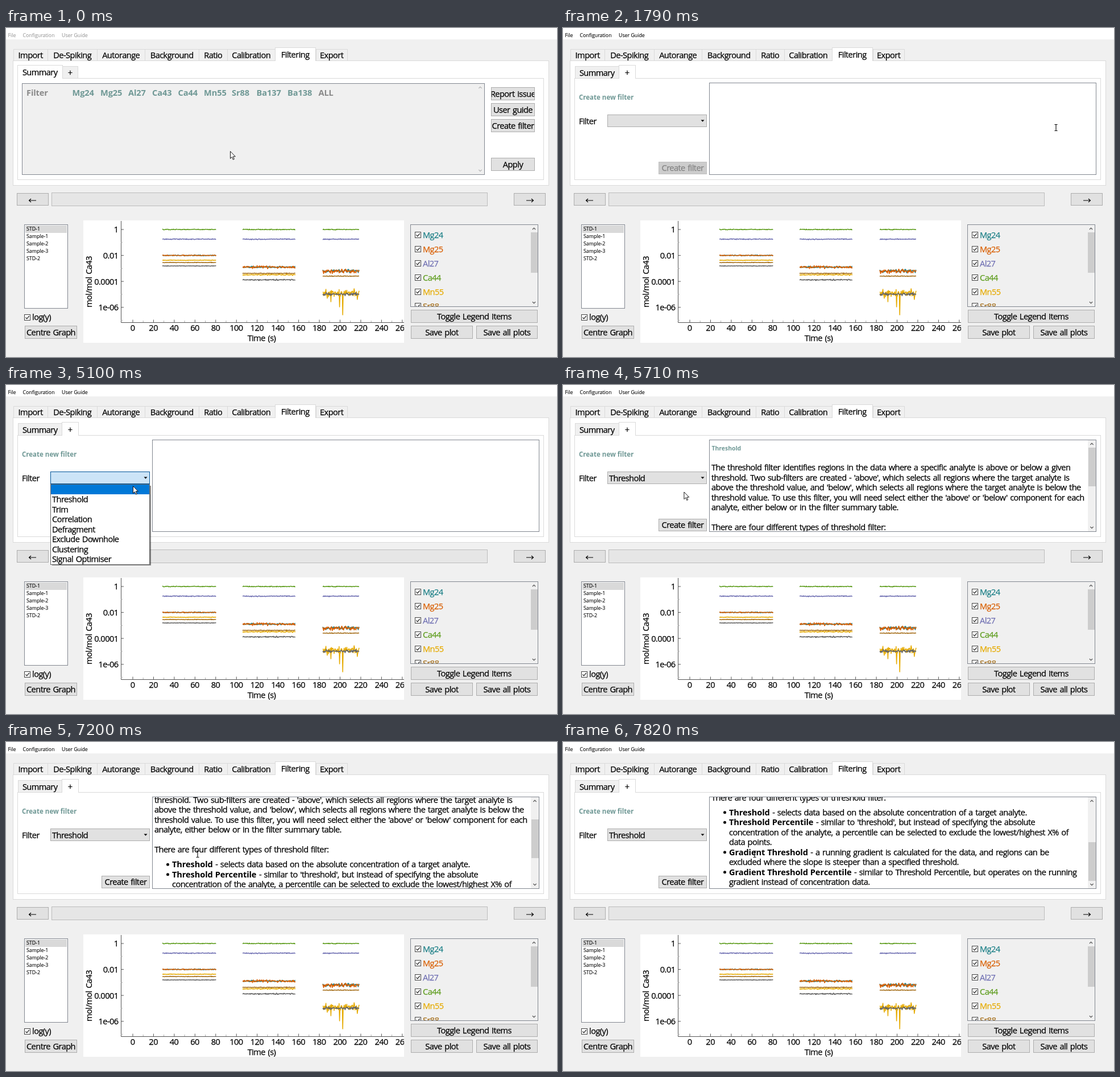
These frames come from a looping animation (969x578 px, 8 s). An HTML page:

```html
<!DOCTYPE html>
<html lang="en">
<head>
<meta charset="utf-8">
<title>Filtering tab</title>
<style>
  html, body { margin: 0; width: 100%; height: 100%; overflow: hidden; background: #f0f0f0; }
  svg { display: block; width: 969px; height: 578px; }
  text { font: 14.6px "Open Sans", "Noto Sans", sans-serif; letter-spacing: -.56px; word-spacing: 1.3px; white-space: pre;
         fill: currentColor; stroke: currentColor; stroke-width: .25px; }
  .small { font-size: 8.8px; letter-spacing: 0; word-spacing: 0; stroke-width: .1px; }
  .bold { font-weight: 700; letter-spacing: -.1px; word-spacing: .3px; stroke: none; }
  .head { font-weight: 700; letter-spacing: -.1px; stroke: none; }
  .h2 { font-size: 11.5px; font-weight: 700; letter-spacing: 0; word-spacing: 0; stroke: none; }
  .h3 { font-size: 10.4px; font-weight: 700; letter-spacing: 0; stroke: none; }
  rect { shape-rendering: crispEdges; }
</style>
</head>
<body>
<svg id="stage" viewBox="0 0 969 578" xmlns="http://www.w3.org/2000/svg"></svg>
<script>
const LOOP = 8000;
const TEAL = '#6f9895', EDGE = '#dadada', FIELD = '#828790';
const FACE = { normal: ['#e1e1e1', '#adadad'], hover: ['#e5f1fb', '#0078d7'],
               down: ['#cce4f7', '#005499'], off: ['#cccccc', '#bfbfbf'] };

// Boxes are given by their outer pixels.
function box(x, y, w, h, fill, stroke, id = '') {
  const o = stroke ? .5 : 0;
  return `<rect ${id && `id="${id}"`} x="${x + o}" y="${y + o}" width="${w - 2 * o}" height="${h - 2 * o}" fill="${fill}" stroke="${stroke || 'none'}"/>`;
}
function text(x, y, s, { cls = '', color = '#000', anchor = 'start', more = '' } = {}) {
  return `<text x="${x}" y="${y}" class="${cls}" color="${color}" text-anchor="${anchor}" ${more}>${s}</text>`;
}
function path(d, stroke, width = 1, fill = 'none', more = '') {
  return `<path d="${d}" stroke="${stroke}" stroke-width="${width}" fill="${fill}" ${more}/>`;
}
const mid = (x, y, s, o = {}) => text(x, y, s, { ...o, anchor: 'middle' });
const clip = (id, x, y, w, h) => `<clipPath id="${id}"><rect x="${x}" y="${y}" width="${w}" height="${h}"/></clipPath>`;

function button(x, y, w, h, label, id = '') {
  const clipId = 'b' + x + '_' + y;
  return box(x, y, w, h, ...FACE.normal, id) + clip(clipId, x + 1, y, w - 2, h) +
    `<g clip-path="url(#${clipId})">${mid(x + w / 2, y + h / 2 + 5.2, label, { more: id && `id="${id}Text"` })}</g>`;
}
function tab(x, y, w, h, label, on, base) {
  return box(x, y, w, h, on ? '#fff' : '#f0f0f0', EDGE) +
    (on ? box(x + 1, y + h - 2, w - 2, 3, '#fff') : '') + mid(x + w / 2 - .3, base, label);
}
function check(x, y) {
  return box(x, y, 11, 11, '#fff', '#444') + path(`M${x + 2.5} ${y + 5.5}l2.2 2.3 4-4.8`, '#222', 1.2);
}
function scrollbar(x, y, w, h, color, thumbY, thumbH, id) {
  const cx = x + w / 2;
  return box(x, y, w, h, '#f0f0f0') +
    (thumbH ? box(x + 1, thumbY, w - 1, thumbH, '#cdcdcd', '', id) : '') +
    path(`M${cx - 2.6} ${y + 8}l2.6-2.6 2.6 2.6M${cx - 2.6} ${y + h - 8}l2.6 2.6 2.6-2.6`, color, 1.2);
}

// ---- Plot ----
const STEP = .8;
let seed = 7;
const rand = () => (seed = (seed * 16807) % 2147483647) / 2147483647;
const noise = () => rand() + rand() + rand() - 1.5;

function trace(x0, x1, level, amp, color, spikes = []) {
  let d = '';
  for (let x = x0; x <= x1; x += STEP) {
    const spike = spikes.find(s => Math.abs(s[0] - x) <= STEP / 2);
    const y = spike ? spike[1] : level + noise() * amp;
    d += (d ? 'L' : 'M') + x.toFixed(1) + ' ' + y.toFixed(1);
  }
  return path(d, color, 1.5, 'none', 'stroke-linejoin="round"');
}

const ELEMENTS = [['Mg24', '#1b7f86'], ['Mg25', '#d95f02'], ['Al27', '#7070b3'],
                  ['Ca44', '#5d9c1c'], ['Mn55', '#e6ab02'], ['Sr88', '#a6701d'], ['Ba', '#666666']];
const SPANS = [[275, 370], [416, 509], [557, 621]];
// Level and noise of each element in the three spans.
const LEVELS = [
  [[399.5, .8], [420, 1.4], [427, 2.6]],
  [[399.5, .8], [420, 2.3], [427, 3.8]],
  [[371, .8], [371, .9], [371, .8]],
  [[354, .7], [354, .7], [354, .7]],
  [[408, .5], [433.5, 1], [466, 6.5]],
  [[412, .5], [431, .8], [436, .7]],
  [[418, .5], [442.5, 1.1], [467.5, 2.6]]
];
const DROPS = [[571.5, 481], [586.5, 490], [592, 504], [612, 458], [617.5, 477]];

function plot() {
  let s = box(136, 338, 564, 215, '#fff');
  s += path('M202.5 339V517.5H700', '#555');
  ['1', '0.01', '0.0001', '1e-06'].forEach((label, i) => {
    const y = 354 + i * 45.6;
    s += path(`M202 ${y}h5`, '#555') + path(`M202 ${y + 22.8}h3`, '#aaa');
    s += text(197.5, y + 5.4, label, { anchor: 'end' });
  });
  for (let i = 0; i < 14; i++) {
    const x = 223 + i * 36.45;
    s += path(`M${x} 517v-4.5`, '#555') + path(`M${x + 18.2} 517v-3`, '#aaa');
    s += mid(x - .3, 532.3, i * 20);
  }
  LEVELS.forEach((spans, e) => spans.forEach(([level, amp], i) => {
    s += trace(...SPANS[i], level, amp, ELEMENTS[e][1], e === 4 && i === 2 ? DROPS : []);
  }));
  s += mid(449.5, 550, 'Time (s)');
  s += mid(0, 0, 'mol/mol Ca43', { more: 'transform="translate(151 446) rotate(-90)"' });
  return clip('plotClip', 136, 338, 564, 215) + `<g clip-path="url(#plotClip)">${s}</g>`;
}

// ---- Window ----
function frameParts() {
  let s = box(0, 0, 969, 578, '#f0f0f0') + box(0, 0, 969, 20, '#fff');
  s += '<g id="menu">' + [[3.5, 'File'], [29.5, 'Configuration'], [98, 'User Guide']]
    .map(([x, label]) => text(x, 16, label, { cls: 'small' })).join('') + '</g>';
  s += box(12, 57, 943, 220, '#fff', EDGE);
  [[13, 61, 'Import'], [73, 88, 'De-Spiking'], [160, 85, 'Autorange'], [244, 96, 'Background'],
   [339, 51, 'Ratio'], [389, 85, 'Calibration'], [545, 56, 'Export']]
    .forEach(([x, w, label]) => s += tab(x, 37, w, 21, label, false, 52.5));
  s += tab(473, 34, 72, 24, 'Filtering', true, 52);
  s += box(20, 88, 926, 179, '#fff', EDGE);
  s += box(80, 289, 767, 24, '#e6e6e6', '#bcbcbc');
  s += button(19, 290, 56, 22, '') + button(893, 290, 56, 22, '');
  s += path('M53 303H40.5m3.5-3l-3.5 3 3.5 3M915 303h12.5m-3.5-3l3.5 3-3.5 3', '#000', 1.1);
  return s;
}

function lowerParts() {
  let s = box(32, 345, 77, 148, '#fff', FIELD) + box(34, 347, 73, 13, '#d9d9d9');
  ['STD-1', 'Sample-1', 'Sample-2', 'Sample-3', 'STD-2']
    .forEach((label, i) => s += text(36, 356.3 + i * 13, label, { cls: 'small' }));
  s += check(32, 503) + text(46, 513, 'log(y)') + button(33, 523, 92, 23, 'Centre Graph');
  s += plot();
  s += box(711, 345, 225, 145, '#f0f0f0', FIELD) + clip('legendClip', 712, 346, 210, 143);
  s += '<g clip-path="url(#legendClip)">' + ELEMENTS.slice(0, 6).map(([name, color], i) =>
    check(719, 358 + i * 25) + text(733, 369 + i * 25, name, { color })).join('') + '</g>';
  s += scrollbar(922, 346, 13, 143, '#555', 359, 71, 'legendThumb');
  s += button(712, 495, 223, 23, 'Toggle Legend Items');
  s += button(712, 523, 109, 23, 'Save plot') + button(827, 523, 108, 23, 'Save all plots');
  return s;
}

function summaryPage() {
  let s = tab(99, 67, 28, 22, '+', false, 84) + tab(20, 65, 80, 24, 'Summary', true, 83);
  s += box(28, 97, 814, 161, '#f0f0f0', FIELD) + scrollbar(827, 98, 14, 159, '#b5b5b5');
  const heads = [[36, 'Filter'], [116.5, 'Mg24'], [166, 'Mg25'], [215, 'Al27'], [257, 'Ca43'], [302.5, 'Ca44'],
                 [348, 'Mn55'], [397, 'Sr88'], [440.5, 'Ba137'], [495, 'Ba138'], [549.5, 'ALL']];
  heads.forEach(([x, label]) => s += text(x, 119.4, label,
    { cls: 'head', color: /\d/.test(label) ? TEAL : '#888' }));
  s += button(853, 104, 77, 23, 'Report issue') + button(853, 132, 77, 23, 'User guide');
  s += button(853, 160, 77, 23, 'Create filter', 'newFilter') + button(853, 228, 77, 23, 'Apply');
  return s;
}

const PARAGRAPH = [
  'The threshold filter identifies regions in the data where a specific analyte is above or below a given',
  "threshold. Two sub-filters are created - 'above', which selects all regions where the target analyte is",
  "above the threshold value, and 'below', which selects all regions where the target analyte is below the",
  "threshold value. To use this filter, you will need select either the 'above' or 'below' component for each",
  'analyte, either below or in the filter summary table.', '',
  'There are four different types of threshold filter:'
];
const BULLETS = [
  ['Threshold', ' - selects data based on the absolute concentration of a target analyte.'],
  ['Threshold Percentile', " - similar to 'threshold', but instead of specifying the absolute"],
  ['', 'concentration of the analyte, a percentile can be selected to exclude the lowest/highest X% of'],
  ['', 'data points.'],
  ['Gradient Threshold', ' - a running gradient is calculated for the data, and regions can be'],
  ['', 'excluded where the slope is steeper than a specified threshold.'],
  ['Gradient Threshold Percentile', ' - similar to Threshold Percentile, but operates on the running'],
  ['', 'gradient instead of concentration data.']
];

function helpText() {
  let s = text(261.5, 115, 'Threshold', { cls: 'h3', color: TEAL });
  PARAGRAPH.forEach((line, i) => s += text(261, 150 + i * 17.5, line));
  BULLETS.forEach(([term, rest], i) => {
    const y = 281.3 + i * 17.5;
    if (term) s += `<circle cx="284.5" cy="${y - 5}" r="2.5"/>`;
    s += text(292, y, (term && `<tspan class="bold">${term}</tspan>`) + rest);
  });
  return s;
}

function createPage() {
  let s = tab(21, 67, 78, 22, 'Summary', false, 83.5) + tab(98, 65, 30, 24, '+', true, 83.5);
  s += text(28, 126, 'Create new filter', { cls: 'h2', color: TEAL }) + text(28, 168.7, 'Filter');
  s += box(78, 152, 175, 22, ...FACE.normal, 'combo') + path('M242.5 161.5h6l-3 3.2z', 'none', 0, '#000');
  s += text(81, 168.7, 'Threshold', { more: 'id="choice"' });
  s += button(168, 235, 85, 22, 'Create filter', 'create');
  s += box(257, 96, 681, 162, '#fff', FIELD) + clip('helpClip', 258, 97, 665, 160);
  s += `<g id="help"><g clip-path="url(#helpClip)"><g id="helpText">${helpText()}</g></g>` +
    scrollbar(923, 97, 14, 160, '#555', 110, 68, 'helpThumb') + '</g>';
  return s;
}

function popupList() {
  let s = `<g opacity=".45">${box(81, 177, 174, 140, '#000')}</g>`;
  s += box(78, 174, 175, 142, '#fff', '#666') + box(79, 175, 173, 17, '#0078d7', '', 'mark');
  ['Threshold', 'Trim', 'Correlation', 'Defragment', 'Exclude Downhole', 'Clustering', 'Signal Optimiser']
    .forEach((label, i) => s += text(81, 206 + i * 17.5, label, { more: i ? '' : 'id="firstItem"' }));
  return clip('popClip', 78, 174, 178, 143) +
    `<g id="popup" clip-path="url(#popClip)"><g id="popupBody">${s}</g></g>`;
}

function pointers() {
  return '<g id="arrow">' + path('M.5.7V13.3L3.4 10.5 5.3 15.2 7.3 14.4 5.4 9.8H9.3Z', '#000', .9, '#fff') + '</g>' +
    '<g id="beam">' + path('M-2.5-5.5H-.8L0-5 .8-5.5H2.5M0-5V5M-2.5 5.5H-.8L0 5 .8 5.5H2.5', '#000', 1.1) + '</g>';
}

const stage = document.getElementById('stage');
stage.innerHTML = frameParts() + lowerParts() +
  `<g id="summary">${summaryPage()}</g><g id="creator">${createPage()}</g>` + popupList() + pointers();

// ---- Motion ----
const $ = id => document.getElementById(id);
const set = (id, name, value) => $(id).setAttribute(name, value);
const show = (id, on) => set(id, 'display', on ? 'inline' : 'none');
function face(id, [fill, stroke]) { set(id, 'fill', fill); set(id, 'stroke', stroke); }

// Pointer moves: start, end, number of steps, target x and y.
const MOVES = [
  [460, 1260, 11, 866, 173], [1320, 1470, 3, 866, 167], [1620, 1620, 1, 867, 175],
  [2630, 3400, 11, 232, 167], [3630, 3800, 3, 223, 161], [5100, 5100, 1, 223, 177],
  [5180, 5410, 4, 221, 187], [5560, 5560, 1, 211, 186], [5710, 5940, 4, 220, 194],
  [6650, 6650, 1, 337, 197]
];
function pointerAt(t) {
  let x = 394, y = 216;
  for (const [t0, t1, n, tx, ty] of MOVES) {
    if (t < t0) break;
    const step = t >= t1 ? n : Math.floor((t - t0) / (t1 - t0) * (n - 1)) + 1;
    const p = step / n, k = p * p * (3 - 2 * p);
    x += (tx - x) * k;
    y += (ty - y) * k;
  }
  return [x, y];
}

const NOTCHES = [6880, 7200, 7270, 7440, 7670];

function draw(t) {
  const [x, y] = pointerAt(t);
  const creating = t >= 1790, chosen = t >= 5710, open = t >= 3630 && !chosen;

  set('menu', 'opacity', t < 1620 ? .4 : 1);
  show('summary', !creating);
  show('creator', creating);

  face('newFilter', t >= 1320 && t < 1470 ? FACE.down : x >= 853 ? FACE.hover : FACE.normal);
  face('combo', chosen ? FACE.normal : t >= 3480 ? FACE.down : x < 253 ? FACE.hover : FACE.normal);
  show('choice', chosen);
  face('create', chosen ? FACE.normal : FACE.off);
  set('createText', 'color', chosen ? '#000' : '#838383');

  show('popup', open);
  const roll = t < 3710 ? .35 : t < 3800 ? .7 : 1;
  set('popupBody', 'transform', `translate(0 ${(roll - 1) * 143})`);
  const onItem = t >= 5300;
  set('mark', 'y', onItem ? 192 : 175);
  set('mark', 'height', onItem ? 18 : 17);
  set('firstItem', 'color', onItem ? '#fff' : '#000');

  show('help', chosen);
  const scroll = NOTCHES.filter(n => t >= n).length * 30.5;
  set('helpText', 'transform', `translate(0 ${-scroll})`);
  set('helpThumb', 'y', Math.round(110 + scroll * 66 / 152.5));

  const beam = t >= 1620 && t < 3400 && x > 257 || t >= 6650;
  show('beam', beam);
  show('arrow', !beam);
  set(beam ? 'beam' : 'arrow', 'transform', `translate(${x.toFixed(1)} ${y.toFixed(1)})`);
}

const start = performance.now();
function tick(now) {
  draw(Math.max(0, now - start) % LOOP);
  requestAnimationFrame(tick);
}
draw(0);
requestAnimationFrame(tick);
</script>
</body>
</html>
```
